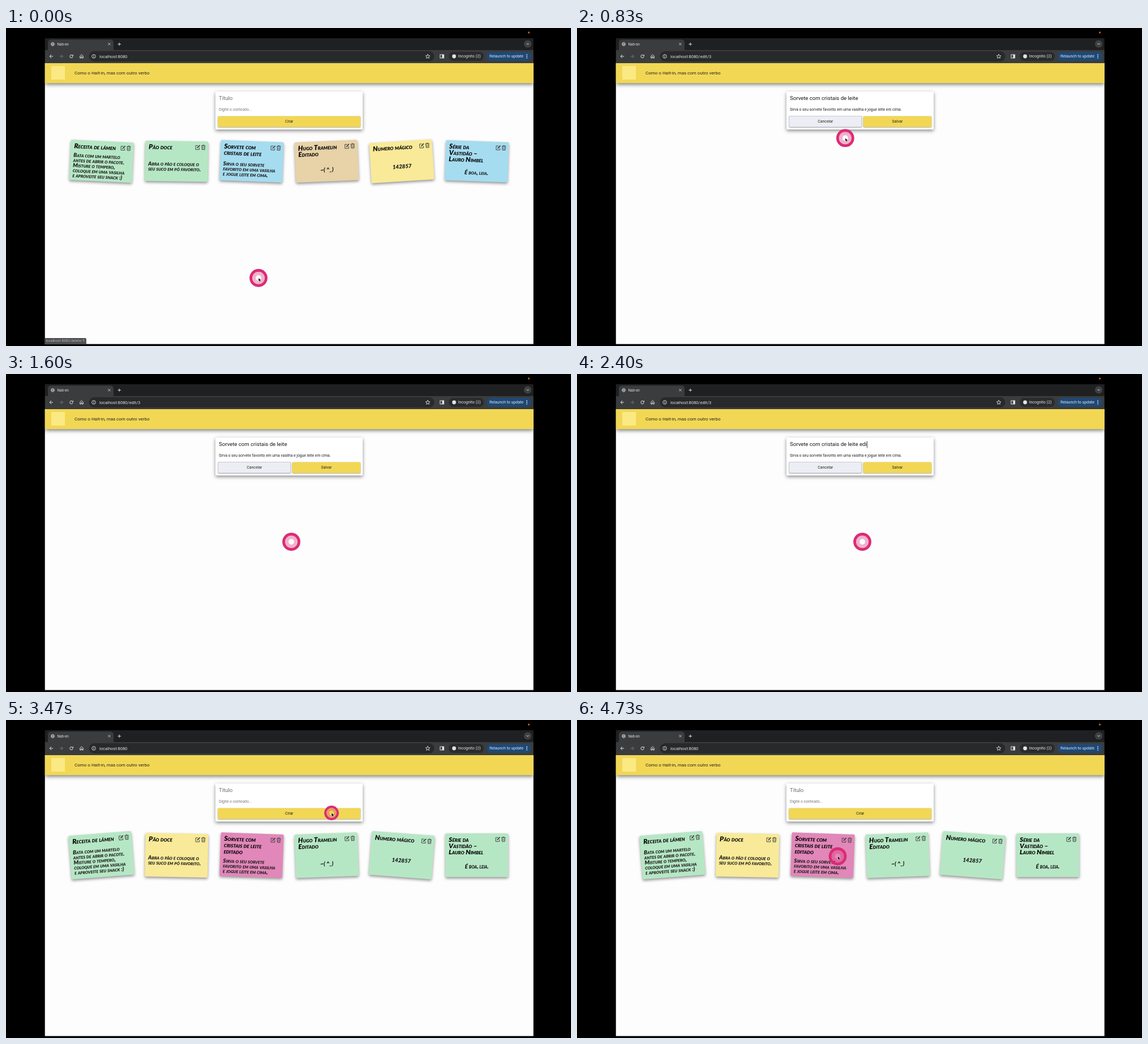
These frames come from a looping animation (998x561 px, 4760 ms). An HTML page with a canvas:

```html
<!DOCTYPE html>
<html lang="pt">
<head>
<meta charset="utf-8">
<title>Nab-on</title>
<style>
html, body { margin: 0; width: 100%; height: 100%; overflow: hidden; background: #000; }
canvas { display: block; width: 998px; height: 561px; }
</style>
</head>
<body>
<canvas id="stage"></canvas>
<script>
const W = 998, H = 561, LOOP = 4760;
const LEFT = 68.5, WIDTH = 863.3, BOTTOM = 557.8;
const canvas = document.getElementById('stage');
const dpr = window.devicePixelRatio || 1;
canvas.width = W * dpr;
canvas.height = H * dpr;
const c = canvas.getContext('2d');

const UI = 'Roboto, "Liberation Sans", sans-serif';
const HAND = 'Lato, "Open Sans", sans-serif';
const YELLOW = '#f2d755', GREEN = '#b6e7c5', BLUE = '#a6dcf0', TAN = '#e8d2a8', LEMON = '#f8ea98', PINK = '#e287b9';

const EDIT_AT = 650, SAVED_AT = 3400;
const TITLE = 'Sorvete com cristais de leite';
const TYPED = ' editado';
const KEYS = [1860, 1990, 2150, 2400, 2480, 2560, 2650, 2740];
const PRESSES = [[540, 640], [1030, 1110], [3290, 3485]];

const NOTES = [
  [['Receita de lámen'], ['Bata com um martelo', 'antes de abrir o pacote.', 'Misture o tempero,', 'coloque em uma vasilha', 'e aproveite seu snack :)']],
  [['Pão doce'], ['Abra o pão e coloque o', 'seu suco em pó favorito.']],
  [['Sorvete com', 'cristais de leite'], ['Sirva o seu sorvete', 'favorito em uma vasilha', 'e jogue leite em cima.']],
  [['Hugo Tramelin', 'Editado'], ['~( ^_)']],
  [['Numero mágico'], ['142857']],
  [['Série da', 'Vastidão –', 'Lauro Nimbel'], ['É boa, leia.']]
];
const BEFORE = {
  h: 71, y: 235,
  colors: [GREEN, GREEN, BLUE, TAN, LEMON, BLUE],
  tilt: [2.7, 0.9, 2.2, -2.4, -3.6, 2]
};
const AFTER = {
  h: 77, y: 238.5,
  colors: [GREEN, LEMON, PINK, GREEN, GREEN, GREEN],
  tilt: [-4.5, 1, 2, -2, 4.3, 0]
};

// time, x, y, easing into the point
const PATH = [
  [0, 446, 441], [30, 446, 441], [480, 471, 211, 'both'], [700, 471, 211],
  [830, 473.5, 195, 'in'], [1000, 500, 125, 'out'], [1150, 500, 125],
  [1430, 504, 296, 'both'], [2930, 504, 296], [3000, 539, 236],
  [3230, 575, 164, 'out'], [3500, 575, 164], [3970, 466.5, 233, 'both'],
  [4500, 460.5, 240.5, 'both'], [LOOP, 460.5, 240.5]
];
const EASE = {
  in: p => p * p,
  out: p => 1 - (1 - p) ** 2,
  both: p => p * p * (3 - 2 * p)
};

function pointerAt(t) {
  const i = PATH.findIndex(k => k[0] > t);
  const a = PATH[i - 1], b = PATH[i];
  let p = (t - a[0]) / (b[0] - a[0]);
  if (b[3]) p = EASE[b[3]](p);
  return [a[1] + (b[1] - a[1]) * p, a[2] + (b[2] - a[2]) * p];
}

function pressAt(t) {
  const ramp = v => Math.max(0, Math.min(1, v / 60));
  return Math.max(...PRESSES.map(([a, b]) => Math.min(ramp(t - a), 1 - ramp(t - b))));
}

function rect(x, y, w, h, color, r = 0) {
  c.fillStyle = color;
  c.beginPath();
  c.roundRect(x, y, w, h, r);
  c.fill();
}

function shadowed(blur, dy, alpha, draw) {
  c.save();
  c.shadowColor = `rgba(0,0,0,${alpha})`;
  c.shadowBlur = blur * dpr;
  c.shadowOffsetY = dy * dpr;
  draw();
  c.restore();
}

function text(str, x, y, size, color, align = 'left') {
  c.font = `400 ${size}px ${UI}`;
  c.fillStyle = color;
  c.textAlign = align;
  c.fillText(str, x, y);
}

function disc(x, y, r, color) {
  c.fillStyle = color;
  c.beginPath();
  c.arc(x, y, r, 0, 7);
  c.fill();
}

function line(color, width, ...pts) {
  c.strokeStyle = color;
  c.lineWidth = width;
  c.beginPath();
  pts.forEach(([x, y], i) => i ? c.lineTo(x, y) : c.moveTo(x, y));
  c.stroke();
}

function circle(x, y, r, color, width, from = 0, to = 2 * Math.PI) {
  c.strokeStyle = color;
  c.lineWidth = width;
  c.beginPath();
  c.arc(x, y, r, from, to);
  c.stroke();
}

function arrow(x, y, dir, color) {
  line(color, 1, [x - 3 * dir, y], [x + 3 * dir, y]);
  line(color, 1, [x, y - 3], [x + 3 * dir, y], [x, y + 3]);
}

function star(x, y, r) {
  const pts = Array.from({ length: 11 }, (_, i) => {
    const a = i * Math.PI / 5 - Math.PI / 2, d = i % 2 ? r * 0.45 : r;
    return [x + d * Math.cos(a), y + d * Math.sin(a)];
  });
  line('#e3e3e3', 0.9, ...pts);
}

function drawTabs() {
  const ink = '#dedede';
  rect(LEFT, 18, WIDTH, 21, '#1f2022');
  rect(74, 20.5, 116, 20, '#3b3c3e', [5, 5, 0, 0]);
  circle(82.5, 28.5, 2.9, ink, 0.8);
  line(ink, 0.7, [79.8, 28.5], [85.2, 28.5]);
  c.strokeStyle = ink;
  c.beginPath();
  c.ellipse(82.5, 28.5, 1.3, 2.9, 0, 0, 7);
  c.stroke();
  text('Nab-on', 90.5, 30.7, 6.3, ink);
  line(ink, 0.9, [180.4, 26.4], [184.4, 30.4]);
  line(ink, 0.9, [184.4, 26.4], [180.4, 30.4]);
  line(ink, 1, [197.4, 28.5], [203, 28.5]);
  line(ink, 1, [200.2, 25.7], [200.2, 31.3]);
  disc(921.5, 28, 6.6, '#3f4042');
  line(ink, 1, [919.4, 27], [921.5, 29.2], [923.6, 27]);
}

function drawToolbar(url) {
  const ink = '#e3e3e3';
  rect(LEFT, 39, WIDTH, 23, '#3b3c3e');
  arrow(80, 50, -1, ink);
  arrow(97.5, 50, 1, '#77787a');
  circle(115.5, 50, 2.7, ink, 1, 0.2, 5.4);
  line(ink, 1, [118.4, 46.8], [118.4, 49.2], [116, 49.2]);
  line(ink, 1, [130.7, 49.5], [130.7, 53], [132.6, 53], [132.6, 50.8], [134.4, 50.8], [134.4, 53], [136.3, 53], [136.3, 49.5], [133.5, 47], [130.7, 49.5]);
  rect(146.5, 41, 610, 18, '#28292b', 9);
  circle(155, 50, 3.3, ink, 0.9);
  line(ink, 0.9, [155, 49.5], [155, 52]);
  rect(154.5, 47.8, 1, 1, ink);
  text(url, 165, 52.5, 7.5, ink);
  star(745, 50.2, 4);
  c.strokeStyle = ink;
  c.lineWidth = 1;
  c.strokeRect(766.8, 47, 6.6, 6);
  rect(770.3, 47, 3, 6, ink);
  rect(782, 42, 62, 16, '#2a2b2d', 8);
  disc(791.5, 50, 3.4, '#e3e3e3');
  text('Incognito (2)', 798.5, 52.4, 7.05, ink);
  rect(849, 42, 79, 16, '#204872', 8);
  text('Relaunch to update', 854, 52.4, 7, '#d6e7fb');
  for (const y of [47.2, 50, 52.8]) disc(920, y, 0.9, '#d6e7fb');
}

function drawHeader() {
  shadowed(7, 2.5, 0.55, () => rect(LEFT, 62, WIDTH, 35.3, YELLOW));
  rect(80, 67, 24, 24, '#fbe983');
  text('Como o Halt-in, mas com outro verbo', 121, 82, 8, '#25231a');
}

function button(label, x, w, color, border) {
  const y = 155.5, h = 19.2;
  shadowed(2, 0.8, 0.4, () => rect(x, y, w, h, color, 1.5));
  if (border) {
    c.strokeStyle = border;
    c.lineWidth = 0.7;
    c.strokeRect(x, y, w, h);
  }
  text(label, x + w / 2, 167.4, 6.85, '#26241c', 'center');
}

function drawForm(editing, t) {
  shadowed(6, 2.5, 0.45, () => rect(370, 112, 260, 67, '#fff', 1));
  if (!editing) {
    text('Título', 376, 127.4, 9.6, '#6a6a6a');
    text('Digite o conteúdo...', 376, 145.5, 6.75, '#777');
    button('Criar', 374.2, 252, YELLOW);
    return;
  }
  const typed = KEYS.filter(k => k <= t).length;
  const value = TITLE + TYPED.slice(0, typed);
  text(value, 376, 127.4, 9.6, '#151515');
  const x = 376 + c.measureText(value).width;
  text('Sirva o seu sorvete favorito em uma vasilha e jogue leite em cima.', 376, 145.5, 6.75, '#222');
  button('Cancelar', 374.8, 128, '#eceef4', '#b9bdd0');
  button('Salvar', 505.5, 120.7, YELLOW);
  if ((t > 1080 && t < 1585) || (t >= 1800 && t < 2770)) rect(x + 0.2, 118.5, 0.8, 12, '#111');
}

function editIcon(x, y) {
  const ink = '#3b3b3b';
  line(ink, 0.9, [x + 0.5, y - 3], [x - 3.6, y - 3], [x - 3.6, y + 4], [x + 3, y + 4], [x + 3, y + 0.6]);
  line(ink, 1.7, [x - 0.9, y + 1.3], [x + 3.7, y - 3.6]);
}

function trashIcon(x, y) {
  const ink = '#3b3b3b';
  line(ink, 0.9, [x - 3.6, y - 2.8], [x + 3.6, y - 2.8]);
  line(ink, 0.8, [x - 1.3, y - 3], [x - 1.3, y - 4], [x + 1.3, y - 4], [x + 1.3, y - 3]);
  line(ink, 0.9, [x - 2.7, y - 2.6], [x - 2.4, y + 4], [x + 2.4, y + 4], [x + 2.7, y - 2.6]);
  for (const dx of [-1, 1]) line(ink, 0.6, [x + dx, y - 1.2], [x + dx, y + 2.8]);
}

function drawNote([title, body], i, set) {
  const top = -set.h / 2;
  c.save();
  c.translate(168.6 + i * 132.6, set.y);
  c.rotate(set.tilt[i] * Math.PI / 180);
  shadowed(5, 2.5, 0.42, () => rect(-55.5, top, 111, set.h, set.colors[i], 2));
  editIcon(37, top + 10.3);
  trashIcon(47, top + 10.3);

  c.textAlign = 'left';
  c.fillStyle = '#060606';
  c.font = `italic small-caps 900 11.8px ${HAND}`;
  title.forEach((s, n) => c.fillText(s, -49.5, top + 14.8 + n * 11.2));

  c.fillStyle = '#1c1c1c';
  c.font = `italic small-caps 900 9.7px ${HAND}`;
  const mid = 4.5 + 5.5 * title.length;
  const width = c.measureText(body[0]).width;
  const x = body.length > 1 ? -50 : -width / 2;
  body.forEach((s, n) => c.fillText(s, x, mid + (n - (body.length - 1) / 2) * 9 + 2.7));
  c.restore();
}

function drawStatus(path) {
  const label = 'localhost:8080' + path;
  c.font = `400 6.4px ${UI}`;
  rect(LEFT, 547, c.measureText(label).width + 5, 11, '#4b4c4e', [0, 2, 0, 0]);
  text(label, 70.5, 554.3, 6.4, '#b4b5b7');
}

function drawPointer(t) {
  const [x, y] = pointerAt(t);
  const k = 1 - 0.19 * pressAt(t);
  circle(x, y, 8.2 * k, 'rgba(224,44,118,0.36)', 6.4 * k);
  circle(x, y, 13.5 * k, '#da2c74', 4.8 * k);
  const hidden = (t > 960 && t < 1150) || (t >= 1430 && t < 2930);
  if (hidden) return;
  c.beginPath();
  [[0, 0], [0, 5.4], [1.3, 4.2], [2.2, 6.2], [3.1, 5.8], [2.3, 3.9], [4, 3.8]]
    .forEach(([dx, dy]) => c.lineTo(x + 0.3 + dx, y + 0.2 + dy));
  c.closePath();
  c.strokeStyle = '#fff';
  c.lineWidth = 1;
  c.stroke();
  c.fillStyle = '#000';
  c.fill();
}

function draw(t) {
  const editing = t >= EDIT_AT && t < SAVED_AT;
  c.setTransform(dpr, 0, 0, dpr, 0, 0);
  rect(0, 0, W, H, '#000');
  disc(923.5, 8, 1.7, '#b8601c');
  c.save();
  c.beginPath();
  c.rect(LEFT, 18, WIDTH, BOTTOM - 18);
  c.clip();
  rect(LEFT, 62, WIDTH, BOTTOM - 62, '#fdfdfd');
  drawHeader();
  drawTabs();
  drawToolbar('localhost:8080' + (editing ? '/edit/3' : ''));
  drawForm(editing, t);
  if (!editing) {
    const set = t < EDIT_AT ? BEFORE : AFTER;
    NOTES.forEach((note, i) => {
      const isEdited = i === 2 && set === AFTER;
      drawNote(isEdited ? [[...note[0], 'editado'], note[1]] : note, i, set);
    });
  }
  if (t < 60) drawStatus('/delete/5');
  else if (t > 450 && t < EDIT_AT) drawStatus('/edit/3');
  drawPointer(t);
  c.restore();
}

const start = performance.now();
function tick() {
  draw((performance.now() - start) % LOOP);
  requestAnimationFrame(tick);
}
tick();
</script>
</body>
</html>
```
